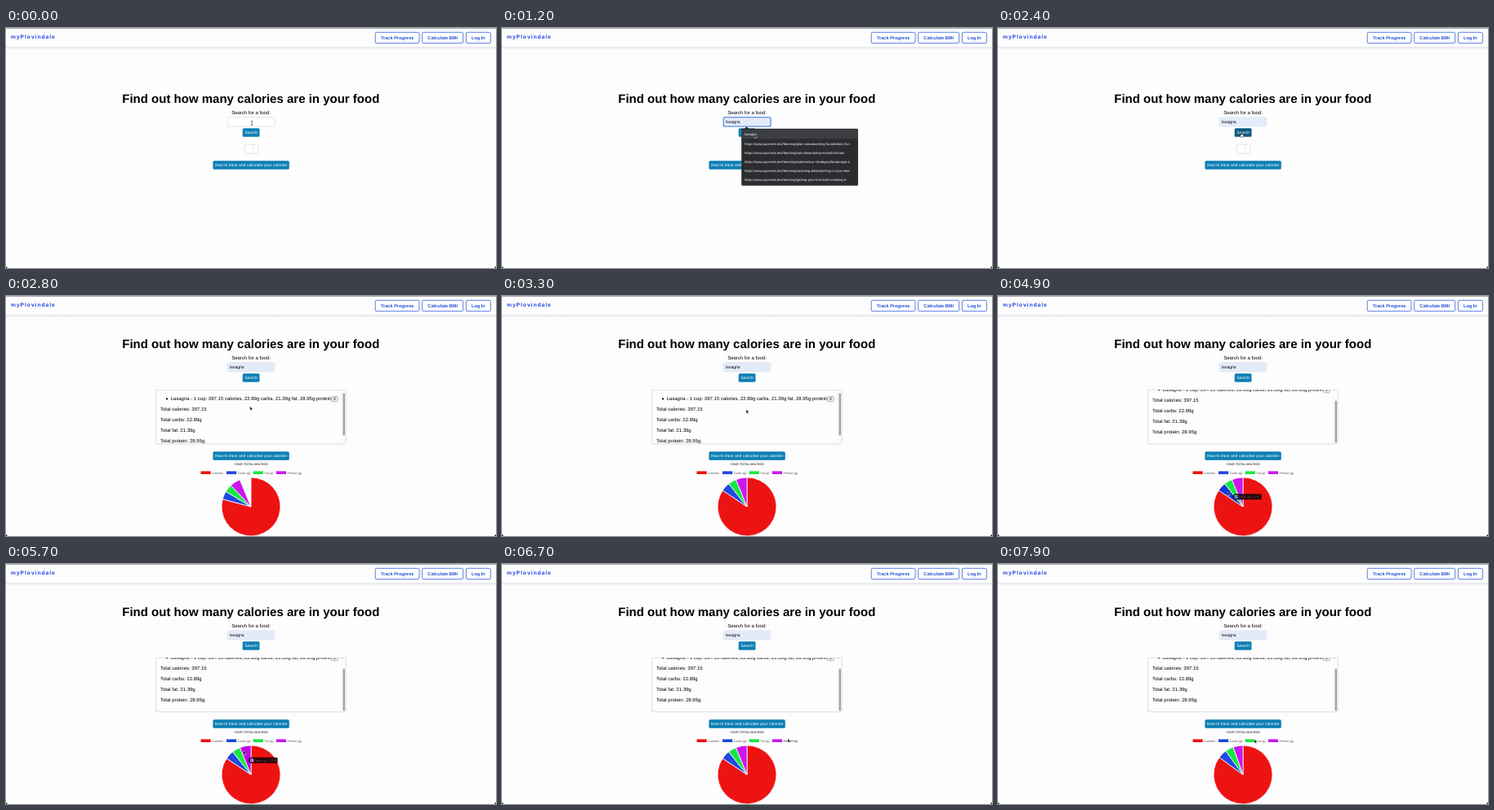
Recreate the animation shown at these times as an HTML page. Size 600 by 295 pixels, loop 8000 ms.

```html
<!DOCTYPE html>
<html lang="en">
<head>
<meta charset="utf-8">
<title>Calorie search</title>
<style>
  html, body { margin: 0; width: 100%; height: 100%; overflow: hidden; background: #fdfdfd; }
  svg { display: block; width: 100vw; height: 100vh; }
  text {
    font-family: "Liberation Sans", Arial, sans-serif;
    font-size: 6px; fill: #000; white-space: pre;
    text-rendering: geometricPrecision;
  }
  .mid { text-anchor: middle; }
  .bold { font-weight: bold; }
  .btn { fill: #0d7fb4; }
  .s5 { font-size: 5px; }
  .white { fill: #fff; }
  .nav rect { fill: #fff; stroke: #5b7de6; stroke-width: 1; }
  .nav text { font-size: 5.6px; font-weight: bold; fill: #2450d8; text-anchor: middle; }
  .tiny { font-size: 3.75px; fill: #555; }
  #menu text { font-size: 4.2px; fill: #f2f2f2; }
</style>
</head>
<body>
<svg viewBox="0 0 600 295" preserveAspectRatio="none">
  <defs>
    <linearGradient id="shade" x2="0" y2="1">
      <stop offset="0" stop-color="#dcdce2"/><stop offset="1" stop-color="#fdfdfd"/>
    </linearGradient>
    <clipPath id="listClip"><rect x="184" y="115.5" width="227" height="66"/></clipPath>
    <clipPath id="menuClip"><rect x="294" y="124" width="138" height="70"/></clipPath>
  </defs>
  <rect width="600" height="295" fill="#fdfdfd"/>
  <rect y="23.5" width="600" height="2.5" fill="url(#shade)"/>
  <rect width="600" height=".7" fill="#8a8a8a"/>
  <text class="bold" x="6" y="13.2" style="font-size:6.6px;letter-spacing:1.02px;fill:#1c41e0">myPlovindale</text>
  <g class="nav">
    <rect x="452.2" y="5.3" width="53.8" height="13.4" rx="1.5"/><text x="479.2" y="14">Track Progress</text>
    <rect x="509.7" y="5.3" width="50" height="13.4" rx="1.5"/><text x="534.7" y="14">Calculate BMI</text>
    <rect x="563.4" y="5.3" width="30" height="13.4" rx="1.5"/><text x="578.4" y="14">Log In</text>
  </g>

  <g id="form">
    <text class="mid bold" x="299.8" y="92.2" style="font-size:15px">Find out how many calories are in your food</text>
    <text class="mid" x="300" y="106">Search for a food:</text>
    <rect id="field" x="271.2" y="109.8" width="57.8" height="11.2" rx="2"/>
    <text id="query" class="s5" x="274" y="117">lasagna</text>
    <rect id="go" class="btn" x="289.7" y="123.2" width="20.8" height="10.5" rx="1.5"/>
    <text class="mid s5 white" x="300.1" y="130.2">Search</text>
  </g>

  <g id="empty" fill="#fff" stroke="#dcdcdc" stroke-width=".7">
    <rect x="292.2" y="143.2" width="16.4" height="11" rx="1.5"/>
    <path d="M303 143.2v11"/>
  </g>

  <g id="results">
    <rect x="182.8" y="115" width="234" height="67.6" rx="2" fill="#ececec"/>
    <rect x="183.8" y="115.4" width="232.2" height="66.2" rx="1.5" fill="#fdfdfd" stroke="#d9d9d9" stroke-width=".6"/>
    <path d="M411.3 115.7v65.6" stroke="#e4e4e4" stroke-width=".5"/>
    <rect id="thumb" x="412.5" width="2.6" height="52" rx="1.3" fill="#a6a6a6"/>
    <g clip-path="url(#listClip)"><g id="list">
      <circle cx="197" cy="126.4" r="1.1"/>
      <text x="201.5" y="128.3">Lasagna - 1 cup: 397.15 calories, 22.89g carbs, 21.39g fat, 28.95g protein</text>
      <rect x="398.6" y="123.4" width="7.6" height="6.4" rx="1" fill="#efefef" stroke="#777" stroke-width=".5"/>
      <text class="mid s5" x="402.4" y="128.4">X</text>
      <text x="189" y="141.2">Total calories: 397.15</text>
      <text x="189" y="154.3">Total carbs: 22.89g</text>
      <text x="189" y="167.4">Total fat: 21.39g</text>
      <text x="189" y="180.4">Total protein: 28.95g</text>
    </g></g>
    <text class="mid bold tiny" x="300" y="208.2">YOUR TOTAL MACROS</text>
    <g id="legend"></g>
    <g id="pie" stroke="#fff" stroke-width=".8" stroke-linejoin="round"></g>
    <g id="tip">
      <rect id="tipBox" height="7" rx="1.5" fill="#000" fill-opacity=".82"/>
      <path id="tipCaret" fill="#000" fill-opacity=".82"/>
      <rect id="tipKey" width="3" height="3" stroke="#fff" stroke-width=".6"/>
      <text id="tipText" class="tiny white"></text>
    </g>
  </g>

  <g id="how">
    <rect class="btn" x="253.4" y="163.2" width="93.4" height="10.6" rx="1.5"/>
    <text class="mid s5 white" x="300" y="170.2">How to track and calculate your calories</text>
  </g>

  <g id="menu">
    <path d="M296.5 124l3-2.8 3 2.8z" fill="#2b2c2f"/>
    <rect x="293.2" y="123.7" width="142.8" height="70" rx="1.5" fill="#2b2c2f"/>
    <rect id="pick" x="293.6" y="125" width="142" height="11.2" fill="#3d3e41"/>
    <g id="rows" clip-path="url(#menuClip)"></g>
  </g>

  <g id="pointer">
    <path id="ibeam" d="M-1.2-2.6q1.2 0 1.2.8v3.6q0 .8 1.2.8M1.2-2.6Q0-2.6 0-1.8M0 1.8q0 .8-1.2.8" fill="none" stroke="#222" stroke-width=".6"/>
    <path id="arrow" d="M0-2.6V2.2l1.1-1 .8 1.9.8-.4-.8-1.8h1.5z" fill="#000" stroke="#fff" stroke-width=".4"/>
    <path id="hand" d="M-.6-2.4q.6-.5 1 0V-.4l2.1.6q.5.3.3 1.1l-.6 1.9H-.7L-2 1.1q0-.8 1.4-.2z" fill="#fff" stroke="#000" stroke-width=".5"/>
  </g>
  <path d="M0 292.6V295h2.4Q.4 294.6 0 292.6zM600 292.6V295h-2.4q2-.4 2.4-2.4z" fill="#111"/>
</svg>
<script>
const NS = 'http://www.w3.org/2000/svg';
const $ = id => document.getElementById(id);
const set = (el, attrs) => { for (const k in attrs) el.setAttribute(k, attrs[k]); return el; };
const add = (parent, tag, attrs, text = '') => {
  const el = set(document.createElementNS(NS, tag), attrs);
  el.textContent = text;
  return parent.appendChild(el);
};
const show = (id, on) => { $(id).style.display = on ? '' : 'none'; };
const clamp = v => Math.min(1, Math.max(0, v));
const easeOut = v => 1 - (1 - clamp(v)) ** 4;

const LOOP = 8000, STEP = 100;
const AT = { open: 800, preview: 1100, choose: 1500, search: 2300, result: 2500,
             scroll: 3400, hide: 6700, restore: 7500 };
const CX = 300, CY = 259, R = 36;

// Pointer stops: time, x, y
const PATH = [
  [0, 301, 117], [800, 301, 117], [1200, 309, 133], [1500, 309, 133],
  [2000, 298, 131], [2500, 298, 131], [3000, 299, 142], [3700, 299, 142],
  [4100, 314, 249], [4400, 314, 249], [4800, 281, 243], [5100, 281, 243],
  [5400, 286, 236], [5700, 291, 232], [6000, 291, 232], [6400, 322, 236],
  [6700, 350, 217], [7500, 350, 217], [7900, 314, 218]
];

const MACROS = [
  { name: 'Calories', value: 397.15, color: '#ee1313', hover: '#f00000', x: 238.5 },
  { name: 'Carbs (g)', value: 22.89, color: '#2148e0', hover: '#0f35d4', x: 270 },
  { name: 'Fat (g)', value: 21.39, color: '#17e840', hover: '#06d82f', x: 302.7 },
  { name: 'Protein (g)', value: 28.95, color: '#cc17ee', hover: '#bd00e2', x: 330.8 }
];

const SITE = 'https://www.quorvela.test/learning/';
['lasagna',
 SITE + 'plain-woodworking-foundations-fun',
 SITE + 'soil-stewardship-essential-traini',
 SITE + 'watercolour-strategies/landscape-a',
 SITE + 'including-birdwatching-in-your-wee',
 SITE + 'getting-your-first-loaf-in-baking-e'
].forEach((label, i) => add($('rows'), 'text', { x: 297, y: 132.3 + i * 11.2 }, label));

for (const m of MACROS) {
  add($('legend'), 'rect', { x: m.x, y: 215.4, width: 12.2, height: 3.6, fill: m.color });
  m.label = add($('legend'), 'text', { x: m.x + 13.8, y: 218.5, class: 'tiny' }, m.name);
  m.slice = add($('pie'), 'path', {});
}

function pointerAt(t) {
  const i = PATH.findIndex(p => p[0] > t);
  if (i < 0) return PATH[PATH.length - 1].slice(1);
  const [t0, x0, y0] = PATH[i - 1], [t1, x1, y1] = PATH[i];
  const k = (t - t0) / (t1 - t0), e = k * k * (3 - 2 * k);
  return [x0 + (x1 - x0) * e, y0 + (y1 - y0) * e];
}

const polar = (a, r) => [CX + r * Math.sin(a), CY - r * Math.cos(a)];

function drawPie(t, px, py) {
  const off = t >= AT.hide && t < AT.restore;
  const weight = t < AT.hide ? 1 : off ? 1 - easeOut((t - AT.hide) / 1000) : easeOut((t - AT.restore) / 1000);
  const values = MACROS.map((m, i) => m.value * (i === 3 ? weight : 1));
  const sweep = 2 * Math.PI * easeOut((t - AT.result + STEP) / 800);
  const total = values.reduce((a, b) => a + b);
  const inside = Math.hypot(px - CX, py - CY) < R;
  const aim = (Math.atan2(px - CX, CY - py) + 2 * Math.PI) % (2 * Math.PI);
  let a = 0, active = null;
  MACROS.forEach((m, i) => {
    const b = a + values[i] / total * sweep;
    const hit = inside && aim >= a && aim < b;
    if (hit) active = { m, mid: (a + b) / 2 };
    const [x0, y0] = polar(a, R), [x1, y1] = polar(b, R);
    set(m.slice, {
      d: `M${CX} ${CY}L${x0} ${y0}A${R} ${R} 0 ${+(b - a > Math.PI)} 1 ${x1} ${y1}Z`,
      fill: hit ? m.hover : m.color
    });
    a = b;
  });
  MACROS[3].label.style.textDecoration = off ? 'line-through' : 'none';
  drawTip(active);
}

function drawTip(active) {
  show('tip', active);
  if (!active) return;
  const { m, mid } = active;
  const [x, y] = polar(mid, R / 2);
  $('tipText').textContent = `${m.name}: ${m.value}`;
  const w = Math.min(34.6, $('tipText').getComputedTextLength() + 7.2);
  const right = x > CX, left = right ? x - 1.6 - w : x + 1.6;
  set($('tipBox'), { x: left, y: y - 3.5, width: w });
  set($('tipCaret'), { d: `M${x} ${y}l${right ? -1.6 : 1.6} -1.6v3.2z` });
  set($('tipKey'), { x: left + 1.6, y: y - 1.5, fill: m.color });
  set($('tipText'), { x: left + 5, y: y + 1.3 });
}

function draw(t) {
  const done = t >= AT.result;
  const [px, py] = pointerAt(t);
  const focus = t >= AT.open && t < AT.search;
  const filled = t >= AT.preview;
  const overGo = !done && px > 289 && px < 311 && py > 123 && py < 134 && t >= AT.choose;

  set($('form'), { transform: `translate(0 ${done ? -28 : 0})` });
  set($('how'), { transform: `translate(0 ${done ? 28 : 0})` });
  set($('field'), {
    fill: filled ? '#e3ebf9' : '#fff',
    stroke: focus ? '#3f74dc' : filled ? '#dfe6f2' : '#d8d8d8',
    'stroke-width': focus ? 1.1 : .7
  });
  show('query', filled);
  $('go').style.fill = overGo ? '#0a5c82' : '';
  show('menu', t >= AT.open && t < AT.choose);
  show('pick', t >= AT.preview);
  show('empty', !done);
  show('results', done);

  if (done) {
    const s = easeOut((t - AT.scroll) / 400);
    set($('list'), { transform: `translate(0 ${-11 * s})` });
    set($('thumb'), { y: 119.5 + 9 * s });
    drawPie(t, px, py);
  }

  const kind = overGo ? 'hand' : t < 1000 ? 'ibeam' : 'arrow';
  for (const id of ['ibeam', 'arrow', 'hand']) show(id, id === kind);
  set($('pointer'), { transform: `translate(${px} ${py})` });
}

const start = performance.now();
function tick() {
  const t = (performance.now() - start) % LOOP;
  draw(Math.floor(t / STEP) * STEP);
  requestAnimationFrame(tick);
}
tick();
</script>
</body>
</html>
```
